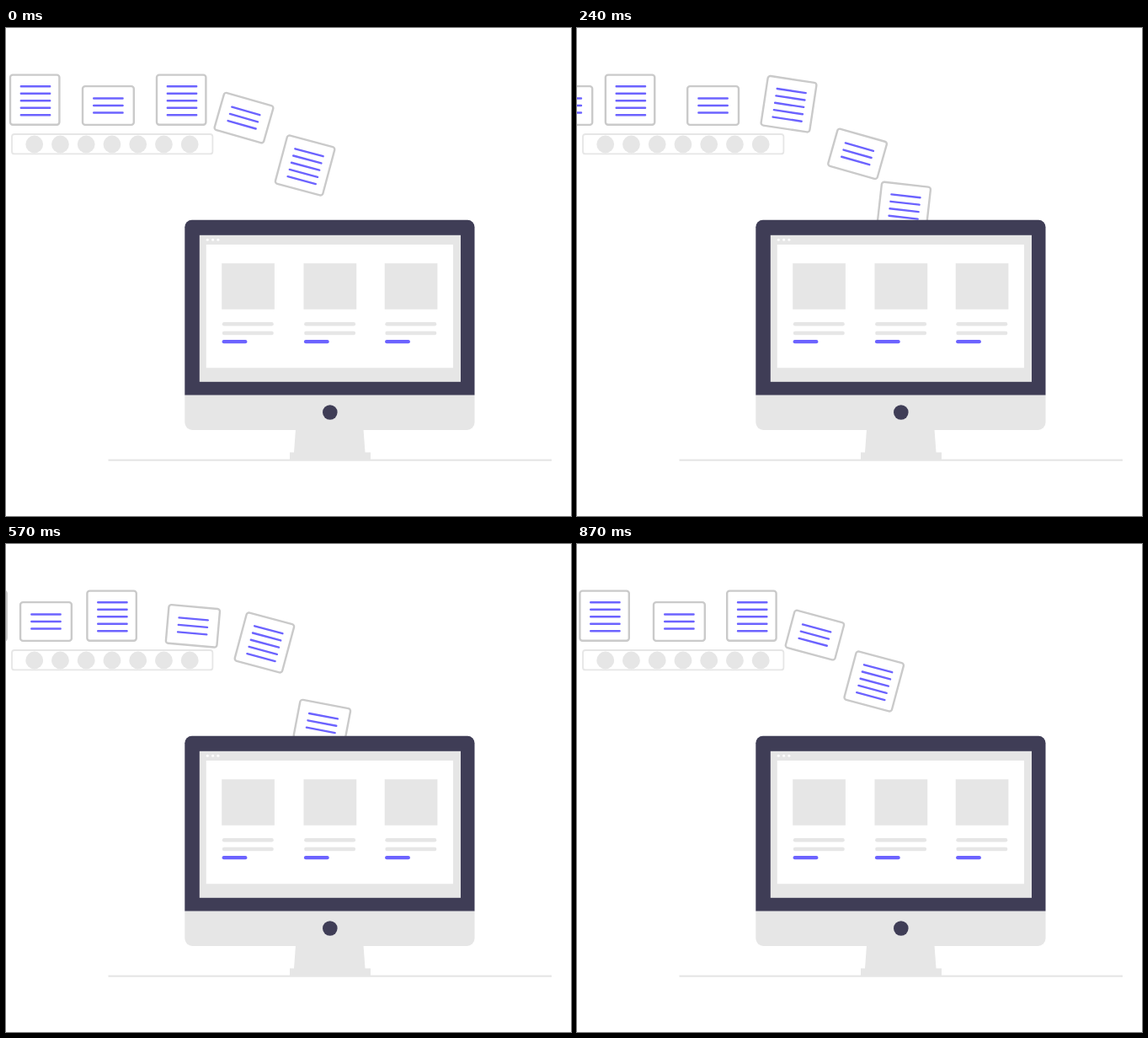
An HTML page for the animation above (900 ms loop, 671 by 579 pixels).

```html
<!DOCTYPE html>
<html lang="en">
<head>
<meta charset="utf-8">
<title>Documents feeding a computer</title>
<style>
  html, body { margin: 0; width: 100%; height: 100%; overflow: hidden; background: #fff; }
  svg { display: block; width: 100%; height: 100%; }
  .sheet { fill: #fff; stroke: #cacaca; stroke-width: 2.4; }
  .text { fill: none; stroke: #6c63ff; stroke-width: 2.4; stroke-linecap: round; }
  .gray { fill: #e6e6e6; }
  .dark { fill: #3f3d56; }
  .white { fill: #fff; }
  .accent { fill: #6c63ff; }
</style>
</head>
<body>
<svg viewBox="0 0 671 579">
  <defs>
    <g id="tall">
      <rect class="sheet" x="-29.2" y="-29.6" width="58.4" height="59.2" rx="3"/>
      <path class="text" d="M-16.4-16h34.4m-34.4 8.5h34.4m-34.4 8.5h34.4m-34.4 8.5h34.4m-34.4 8.5h34.4"/>
    </g>
    <g id="short">
      <rect class="sheet" x="-30.4" y="-22.9" width="60.8" height="45.8" rx="3"/>
      <path class="text" d="M-17.2-8.5h34.4m-34.4 8.5h34.4m-34.4 8.5h34.4"/>
    </g>
    <g id="item">
      <rect class="gray" y="279.2" width="62.7" height="54.6"/>
      <rect class="gray" x=".6" y="349.1" width="61" height="4.4" rx="2.2"/>
      <rect class="gray" x=".6" y="359.8" width="61" height="4.4" rx="2.2"/>
      <rect class="accent" x=".4" y="370" width="29.8" height="4.3" rx="2.1"/>
    </g>
  </defs>

  <rect x="7" y="126" width="238.4" height="23.4" rx="3" fill="#fff" stroke="#e6e6e6" stroke-width="1.8"/>
  <g id="rollers" class="gray"></g>
  <g id="cards"></g>

  <rect class="gray" x="121.5" y="511.6" width="526.5" height="2.2"/>
  <path class="gray" d="M344 476H424.500L426.500 503.500H433V513H337V503.500H342Z"/>
  <path class="gray" d="M212.300 435H556.500V468a9 9 0 0 1-9 9H221.300a9 9 0 0 1-9-9Z"/>
  <path class="dark" d="M212.300 435.500V236.200a8.500 8.500 0 0 1 8.500-8.500H548a8.500 8.500 0 0 1 8.500 8.500V435.500Z"/>
  <circle class="dark" cx="384.8" cy="456" r="8.8"/>
  <rect class="gray" x="229.8" y="245.8" width="310.2" height="174"/>
  <rect class="white" x="237.8" y="257" width="293.2" height="146.2"/>
  <g class="white">
    <circle cx="239.300" cy="251.300" r="1.500"/>
    <circle cx="245.600" cy="251.300" r="1.500"/>
    <circle cx="251.900" cy="251.300" r="1.500"/>
  </g>
  <use href="#item" x="256.200"/>
  <use href="#item" x="353.500"/>
  <use href="#item" x="449.700"/>
</svg>
<script>
const LOOP = 900, STEP = 30, MID = 420, END = 870;

// Poses are [x, y, degrees] at 0, MID and END; null means out of sight.
const cards = [
  ['tall', null, [-59, 85.2, 0], [32.6, 85.2, 0]],
  ['short', [-42.5, 92, 0], [10.5, 92, 0], [121.4, 92, 0]],
  ['tall', [34.2, 85.2, 0], [84.7, 85.2, 0], [207.4, 85.2, 0]],
  ['short', [121.4, 92, 0], [191.7, 92, 0], [282.4, 108.1, 15]],
  ['tall', [208.2, 85.2, 0], [284, 94, 15], [352.7, 163, 15]],
  ['short', [282.5, 106.6, 16], [371, 181.3, 15.7], [384.2, 275, 1]],
  ['tall', [355.1, 163, 15], [412.5, 254.2, 0], null],
];

function add(parent, tag, attrs) {
  const node = document.createElementNS('http://www.w3.org/2000/svg', tag);
  for (const name in attrs) node.setAttribute(name, attrs[name]);
  return document.getElementById(parent).appendChild(node);
}

for (let i = 0; i < 7; i++) add('rollers', 'circle', { cx: 33.7 + 30.75 * i, cy: 138, r: 10.4 });
const nodes = cards.map(([kind]) => add('cards', 'use', { href: '#' + kind }));

function draw() {
  const t = Math.floor(performance.now() % LOOP / STEP) * STEP;
  const second = t >= MID;
  const k = second ? (t - MID) / (END - MID) : t / MID;
  cards.forEach(([, start, mid, end], i) => {
    const [from, to] = second ? [mid, end] : [start, mid];
    nodes[i].style.display = from && to ? '' : 'none';
    if (!from || !to) return;
    const [x, y, angle] = from.map((v, j) => v + (to[j] - v) * k);
    nodes[i].setAttribute('transform', `translate(${x} ${y}) rotate(${angle})`);
  });
  requestAnimationFrame(draw);
}
draw();
</script>
</body>
</html>
```
